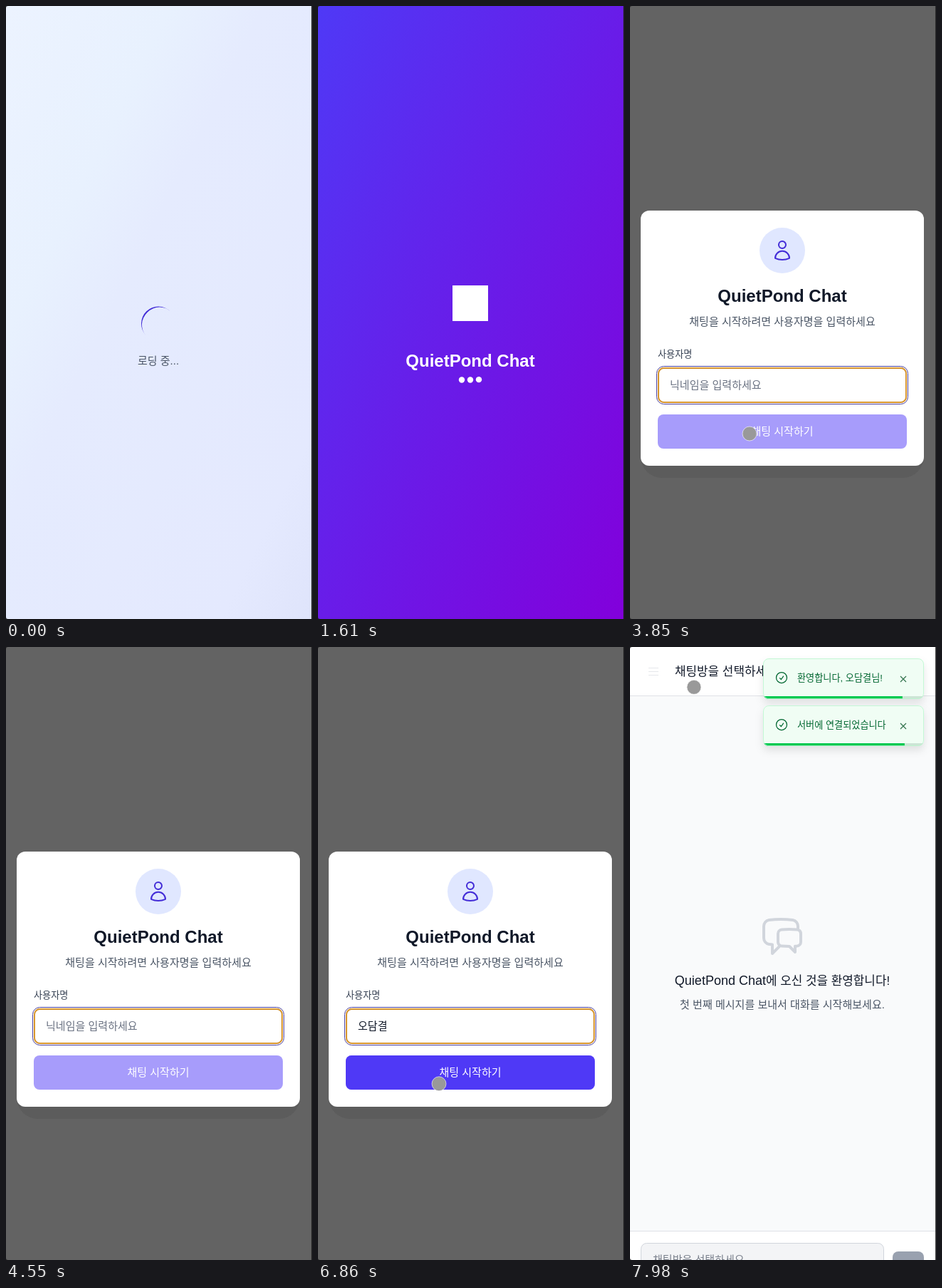
Recreate the animation shown at these times as an HTML page. Size 430 px wide and 860 px high, loop 8000 ms.

```html
<!DOCTYPE html>
<html lang="ko">
<head>
<meta charset="utf-8">
<title>QuietPond Chat</title>
<style>
  html, body { margin: 0; width: 100%; height: 100%; overflow: hidden; }
  svg { display: block; width: 100vw; height: 100vh; }
  text { font-family: "Liberation Sans", "Noto Sans CJK KR", "Noto Sans CJK", sans-serif; white-space: pre; }
  .mid { text-anchor: middle; }
  .bold { font-weight: 700; }
  .med { font-weight: 500; }
  /* Hangul steps: 18, 16, 14 and 13 px interface sizes */
  .k18 { font-size: 16.9px; }
  .k16 { font-size: 15.04px; }
  .k14 { font-size: 13.16px; }
  .k13 { font-size: 12.1px; }
  .line { fill: none; stroke-width: 1.5; stroke-linecap: round; stroke-linejoin: round; }
  .toast { filter: drop-shadow(0 6px 6px rgba(0, 0, 0, .1)); }
</style>
</head>
<body>
<svg viewBox="0 0 430 860" preserveAspectRatio="none">
  <defs>
    <linearGradient id="pale" x1="0" y1="0" x2="1" y2="1">
      <stop offset="0" stop-color="#ecf3ff"/>
      <stop offset=".27" stop-color="#e8f1fe"/>
      <stop offset=".42" stop-color="#e5ebfe"/>
      <stop offset=".85" stop-color="#e4e9fe"/>
      <stop offset="1" stop-color="#dfe4fb"/>
    </linearGradient>
    <linearGradient id="vivid" x1="0" y1="0" x2="1" y2="1">
      <stop offset="0" stop-color="#4f39f6"/>
      <stop offset="1" stop-color="#8200db"/>
    </linearGradient>
    <clipPath id="card"><rect width="226" height="57" rx="8"/></clipPath>
  </defs>

  <g id="loading">
    <rect width="430" height="860" fill="url(#pale)"/>
    <path id="spinner" d="M-24 0A24 24 0 0 0 24 0A24 22 0 0 1-24 0" fill="#432dd7"/>
    <text class="mid k16" x="214" y="503" fill="#4a5565">로딩 중...</text>
  </g>

  <g id="splash" fill="#fff">
    <rect width="430" height="860" fill="url(#vivid)"/>
    <rect x="189" y="392" width="50" height="50"/>
    <text class="mid bold" x="214" y="506" font-size="24">QuietPond Chat</text>
    <circle class="bounce" cx="202" r="4.2"/>
    <circle class="bounce" cx="214" r="4.2"/>
    <circle class="bounce" cx="226" r="4.2"/>
  </g>

  <g id="login">
    <rect width="430" height="860" fill="#636363"/>
    <rect x="15" y="560" width="398" height="102" rx="30" fill="#5c5c5c"/>
    <rect x="15" y="287" width="398" height="358" rx="12" fill="#fff"/>
    <circle cx="214" cy="343" r="32" fill="#e0e7ff"/>
    <path class="line" stroke="#432dd7" transform="translate(198 327) scale(1.3333)" d="M15.75 6a3.75 3.75 0 1 1-7.5 0 3.75 3.75 0 0 1 7.5 0ZM4.5 20.12a7.5 7.5 0 0 1 15 0A17.93 17.93 0 0 1 12 21.75c-2.68 0-5.22-.58-7.5-1.63Z"/>
    <text class="mid bold" x="214" y="415" font-size="24" fill="#101828">QuietPond Chat</text>
    <text class="mid k16" x="214" y="448" fill="#4a5565">채팅을 시작하려면 사용자명을 입력하세요</text>
    <text class="med k14" x="39" y="493" fill="#364153">사용자명</text>
    <rect x="39.5" y="507.5" width="349" height="49" rx="8" fill="#fff" stroke="#d1d5dc"/>
    <g id="focus" fill="none">
      <rect x="37.5" y="505.5" width="353" height="53" rx="10" stroke="#4840a0"/>
      <rect x="40" y="508" width="348" height="48" rx="7.5" stroke="#d6942c" stroke-width="2"/>
    </g>
    <text id="hint" class="k16" x="56" y="537" fill="#6a7282">닉네임을 입력하세요</text>
    <text id="typed" class="k16" x="56" y="537" fill="#101828"></text>
    <rect id="under" y="539.5" width="13.8" height="1.2" fill="#101828"/>
    <rect id="caret" y="523" width="1" height="18" fill="#101828"/>
    <rect x="39" y="573" width="350" height="48" rx="8" fill="#a79cfb"/>
    <rect id="ready" x="39" y="573" width="350" height="48" rx="8" fill="#4f39f6"/>
    <text class="mid med k16" x="214" y="602" fill="#fff">채팅 시작하기</text>
    <g id="suggest" style="filter:drop-shadow(0 1px 1.5px rgba(0,0,0,.5))">
      <path d="M149 567L156 560Q158.500 557.500 161 560L168 567Z" fill="#1e1e1e"/>
      <rect x="138" y="566" width="156" height="44" rx="6" fill="#1e1e1e"/>
      <text class="med k13" x="150" y="592" fill="#fff">오담결</text>
    </g>
  </g>

  <g id="room">
    <rect width="430" height="860" fill="#f9fafb"/>
    <path d="M0 0H430V68H0ZM0 819H430V860H0Z" fill="#fff"/>
    <path d="M0 68.500H430M0 819.500H430" stroke="#dfe2e7"/>
    <path d="M26 29.500H40M26 34.500H40M26 39.500H40" stroke="#e5e7eb"/>
    <text class="med k18" x="63" y="39.500" fill="#101828">채팅방을 선택하세요</text>
    <rect x="329" y="20" width="84" height="28" rx="14" fill="#faf1ef"/>
    <rect id="online" x="329" y="20" width="84" height="28" rx="14" fill="#f0fdf4"/>
    <path class="line" stroke="#16a34a" transform="translate(341 25) scale(.6667)" d="M8.3 15a5.250 5.250 0 0 1 7.4 0M5.100 11.850c3.800-3.800 10-3.800 13.800 0M1.900 8.700c5.600-5.600 14.600-5.600 20.200 0M12.500 18.200l-.5.5-.5-.5a.75.75 0 0 1 1 0Z"/>
    <text class="med k14" x="364" y="38" fill="#16a34a">연결됨</text>
    <path class="line" stroke="#d1d5dc" transform="translate(182 374) scale(2.6667)" d="M20.25 8.51c.88.28 1.5 1.13 1.5 2.1v4.28c0 1.14-.85 2.1-1.98 2.2-.34.02-.68.05-1.02.07v3.09l-3-3c-1.35 0-2.69-.06-4.02-.16a2.1 2.1 0 0 1-.83-.25m9.35-8.33a2.1 2.1 0 0 0-.48-.1 48.6 48.6 0 0 0-8.04 0c-1.13.1-1.98 1.06-1.98 2.2v4.28c0 .84.46 1.58 1.15 1.95m9.35-8.33V6.64c0-1.62-1.15-3.03-2.76-3.24A48.5 48.5 0 0 0 11.25 3c-2.12 0-4.2.14-6.24.4-1.61.21-2.76 1.62-2.76 3.24v6.22c0 1.62 1.15 3.03 2.76 3.24.58.07 1.16.14 1.74.19V21l4.16-4.16"/>
    <text class="mid med k18" x="214" y="474" fill="#101828"><tspan font-size="18">QuietPond Chat</tspan>에 오신 것을 환영합니다!</text>
    <text class="mid k16" x="214" y="507" fill="#4a5565">첫 번째 메시지를 보내서 대화를 시작해보세요.</text>
    <rect x="15.5" y="836.500" width="341" height="50" rx="8" fill="#f3f4f6" stroke="#d1d5dc"/>
    <text class="k16" x="32" y="865" fill="#7a808c">채팅방을 선택하세요</text>
    <rect x="369" y="848" width="44" height="44" rx="8" fill="#99a1af"/>
    <g id="toasts"></g>
  </g>

  <circle id="dot" r="10" fill="#999" stroke="#fff" stroke-opacity=".6"/>
  <path id="arrow" transform="translate(163 532)" d="M0 0V14L3.200 11.200 5.500 16.500 8 15.400 5.700 10.200H10Z" stroke="#fff" stroke-width="1"/>
  <path d="M429 0H430V860H429ZM0 0H3Q0 0 0 3ZM0 860V857Q0 860 3 860Z" fill="#222" fill-opacity=".85"/>
</svg>

<script>
const LOOP = 8000, STEP = 70;
const SPLASH = 210, LOGIN = 1680, ROOM = 7210;
const $ = id => document.getElementById(id);
const set = (el, attrs) => { for (const k in attrs) el.setAttribute(k, attrs[k]); };
const show = (el, on) => { el.style.display = on ? '' : 'none'; };
const ramp = (t, a, b) => Math.min(1, Math.max(0, (t - a) / (b - a)));
const smooth = p => p * p * (3 - 2 * p);

const typing = [
  [0, ''], [5110, 'ㅇ'], [5320, '오'], [5600, '옫'], [5670, '오다'],
  [5810, '오담'], [5880, '오담ㄱ'], [5950, '오담겨'], [6090, '오담결']
];

// Pointer keys: time, x, y
const moves = [
  [[2170, 203, 829], [2520, 162, 492], [2660, 162, 533]],
  [[3500, 163, 533], [3710, 168, 579], [3850, 168, 600], [4060, 172, 790]],
  [[6510, 170, 560], [6930, 170, 617], [7280, 170, 617], [8050, 88, 43]]
];
const dotSpans = [[2170, 2800], [3500, 4060], [6510, LOOP]];

const toasts = [
  { start: 7180, y: 16, label: '환영합니다, 오담결님!' },
  { start: 7260, y: 82, label: '서버에 연결되었습니다' }
];
for (const toast of toasts) {
  $('toasts').insertAdjacentHTML('beforeend', `
    <g class="toast">
      <g clip-path="url(#card)">
        <rect width="226" height="57" fill="#f0fdf4"/>
        <rect y="53" width="226" height="4" fill="#cce5d5"/>
        <rect class="bar" y="53" height="4" fill="#00c950"/>
      </g>
      <rect x=".5" y=".5" width="225" height="56" rx="7.5" fill="none" stroke="#b9f8cf" stroke-opacity=".8"/>
      <path class="line" stroke="#016630" transform="translate(16 17) scale(.8333)" d="M9 12.75 11.25 15 15 9.75M21 12a9 9 0 1 1-18 0 9 9 0 0 1 18 0Z"/>
      <text class="med k14" x="48" y="32" fill="#016630">${toast.label}</text>
      <path d="M193 25l8 8m0-8l-8 8" stroke="#35744f" stroke-width="1.2"/>
    </g>`);
  toast.el = $('toasts').lastElementChild;
  toast.bar = toast.el.querySelector('.bar');
}

function drawPointer(t) {
  const i = dotSpans.findIndex(([a, b]) => t >= a && t < b);
  show($('dot'), i >= 0);
  show($('arrow'), t >= 2800 && t < 3500);
  if (i < 0) return;
  const keys = moves[i];
  let n = keys.findIndex(k => k[0] > t);
  if (n < 0) n = keys.length - 1;
  const [a, b] = [keys[n - 1], keys[n]];
  const p = smooth(ramp(t, a[0], b[0]));
  set($('dot'), { cx: a[1] + (b[1] - a[1]) * p, cy: a[2] + (b[2] - a[2]) * p });
}

function drawLogin(t) {
  const word = typing.filter(k => k[0] <= t).pop()[1];
  const end = 56 + word.length * 13.84;
  $('typed').textContent = word;
  show($('hint'), !word);
  show($('under'), word && t < 6510);
  show($('caret'), word && t < 6510);
  set($('under'), { x: end - 13.84 });
  set($('caret'), { x: end });
  show($('suggest'), t >= 5670 && t < 6090);
  set($('focus'), { opacity: ramp(t, 3430, 3710) });
  set($('ready'), { opacity: ramp(t, 5040, 5320) });
}

function drawRoom(t) {
  set($('online'), { opacity: ramp(t, ROOM, ROOM + 150) });
  for (const { start, y, el, bar } of toasts) {
    const p = 1 - (1 - ramp(t, start, start + 300)) ** 2;
    set(el, { transform: `translate(${187 + 226 * (1 - p)} ${y})`, opacity: p });
    set(bar, { width: 226 * (1 - ramp(t, start, start + 6000)) });
  }
}

function draw(t) {
  show($('loading'), t < SPLASH);
  show($('splash'), t >= SPLASH && t < LOGIN);
  show($('login'), t >= LOGIN && t < ROOM);
  show($('room'), t >= ROOM);
  set($('spinner'), { transform: `translate(214 445.5) rotate(${136 + t * .36})` });
  document.querySelectorAll('.bounce').forEach((el, i) => {
    const phase = ((t - i * 150 - 50) / 1000 + 1) % 1;
    set(el, { cy: 524.6 - 2 * (1 - 2 * phase) ** 2 });
  });
  drawLogin(t);
  drawRoom(t);
  drawPointer(t);
}

const begin = performance.now();
function tick() {
  const t = (performance.now() - begin) % LOOP;
  draw(Math.floor(t / STEP) * STEP);
  requestAnimationFrame(tick);
}
tick();
</script>
</body>
</html>
```
